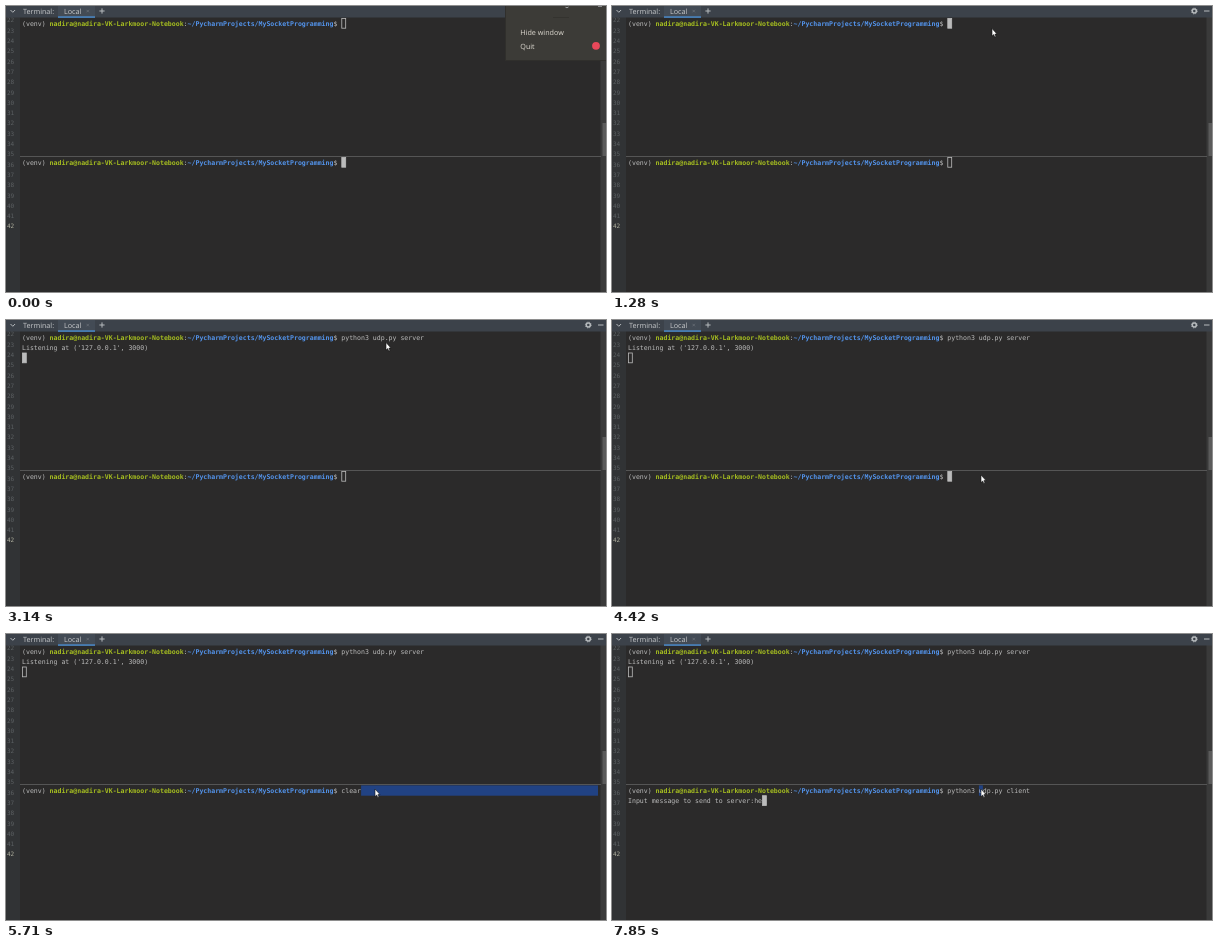
Animation of 600 by 286 pixels, one loop 8000 ms. Source, as an HTML page:

```html
<!DOCTYPE html>
<html lang="en">
<head>
<meta charset="utf-8">
<title>Terminal session</title>
<style>
  html, body { margin: 0; width: 100%; height: 100%; overflow: hidden; background: #2b2a2a; }
  svg { display: block; width: 600px; height: 286px; }
  text { text-rendering: geometricPrecision; white-space: pre; }
  .mono { font: 6.55px "DejaVu Sans Mono", "Noto Sans Mono", monospace; fill: #bbb; }
  .user { font-weight: bold; fill: #a5bd20; }
  .path { font-weight: bold; fill: #5394ec; }
  .ui { font: 7.2px "Open Sans", "Noto Sans", sans-serif; fill: #c8cacc; }
  .num { font: 6px "DejaVu Sans Mono", monospace; fill: #5c6063; }
  .line { fill: none; stroke: #b6babd; stroke-width: 1; }
</style>
</head>
<body>
<svg viewBox="0 0 600 286">
  <rect width="600" height="286" fill="#2b2a2a"/>
  <rect width="14" height="286" fill="#313335"/>
  <g id="gutter"></g>
  <rect x="594.5" y="11" width="5.5" height="275" fill="#3a3a3a"/>
  <rect x="596.5" y="117" width="3.5" height="33" fill="#5b5b5b"/>
  <rect x="14" y="150" width="581" height="1" fill="#555"/>

  <rect width="600" height="11.5" fill="#3c424a"/>
  <rect x="52" width="37" height="11.5" fill="#434b55"/>
  <rect x="52" y="10.3" width="37" height="1.5" fill="#4a88c7"/>
  <path class="line" d="M4.5 4L6.8 6.3L9.1 4M93.4 5H98.6M96 2.4V7.6M592 5H597.5"/>
  <path class="line" d="M80.5 3.8L83 6.3M83 3.8L80.5 6.3" style="stroke:#747a80;stroke-width:.6"/>
  <text class="ui" x="17" y="7.6">Terminal:</text>
  <text class="ui" x="58" y="7.6">Local</text>
  <circle class="line" cx="582.3" cy="5" r="2" style="stroke-width:1.5"/>
  <circle class="line" cx="582.3" cy="5" r="2.9" style="stroke-width:.9;stroke-dasharray:1.14"/>

  <rect id="selection" height="10.3" y="151.4" fill="#214283"/>
  <g id="top"></g>
  <g id="bottom"></g>

  <g id="menu">
    <rect x="499.5" y="-1" width="102" height="55.5" fill="#3c3b37" stroke="#302f2c"/>
    <path d="M559.5 1.3q1.6 1 3 -.3M592 .3h4" class="line" style="stroke-width:.8"/>
    <path d="M547 11.5h16" stroke="#34332f"/>
    <text class="ui" x="514.3" y="28.6" style="fill:#dfdbd2">Hide window</text>
    <text class="ui" x="514.3" y="43" style="fill:#dfdbd2">Quit</text>
    <circle cx="590" cy="39.8" r="3.9" fill="#e8485a"/>
  </g>
  <path id="mouse" d="M0 0V7.6L1.7 6.1L2.8 8.6L4 8L2.9 5.6H5Z" fill="#fff" stroke="#111" stroke-width=".6"/>
</svg>
<script>
const LOOP = 8000, CELL = 3.943, ROW = 10.3, LEFT = 16, PROMPT = 81;
const $ = id => document.getElementById(id);
const col = n => LEFT + n * CELL;
const prompt = '(venv) <tspan class="user">nadira@nadira-VK-Larkmoor-Notebook</tspan>:' +
  '<tspan class="path">~/PycharmProjects/MySocketProgramming</tspan>$ ';

for (let n = 22; n <= 42; n++) {
  $('gutter').innerHTML += `<text class="num" x="1" y="${16.4 + (n - 22) * ROW}"` +
    `${n === 42 ? ' style="fill:#b0b0a0"' : ''}>${n}</text>`;
}

// Value of the last [time, value] step reached
const at = (t, steps) => steps.filter(s => s[0] <= t).pop()[1];

function pane(id, y, command, output, focused, showCursor = true) {
  const row = output == null ? 0 : output.endsWith('\n') ? 2 : 1;
  const n = [PROMPT + command.length, (output || '').length, 0][row];
  let html = `<text class="mono" x="${LEFT}" y="${y + 7.8}">${prompt}${command}</text>`;
  if (row) html += `<text class="mono" x="${LEFT}" y="${y + 7.8 + ROW}">${output.trim()}</text>`;
  if (showCursor) {
    html += `<rect x="${col(n) + .4}" y="${y + row * ROW + .2}" width="3.9" height="9.8" ` +
      `fill="${focused ? '#bbb' : 'none'}" stroke="#bbb" stroke-width=".8"/>`;
  }
  if ($(id).dataset.html !== html) $(id).innerHTML = $(id).dataset.html = html;
}

const ease = p => { p = Math.min(1, Math.max(0, p)); return p * p * (3 - 2 * p); };

function draw(t) {
  $('menu').style.display = t < 140 ? '' : 'none';

  const tick = Math.floor(t * .007 + .05) / .007;
  const enter = ease((tick - 430) / 570), down = ease((tick - 3860) / 420);
  const mx = 570 - 190 * enter - 11 * down, my = 5 + 17.5 * enter + 132.5 * down;
  $('mouse').style.display = t < 570 ? 'none' : '';
  $('mouse').setAttribute('transform', `translate(${mx} ${my})`);

  const topFocus = t >= 1140 && t < 4280;
  const server = at(t, [[0, ''], [1850, 'clear'], [2140, 'python3 udp.py server']]);
  const client = at(t, [[0, ''], [5280, 'clear'], [5850, 'python3 udp.py client']]);
  const typed = at(t, [[0, ''], [7710, 'h'], [7850, 'he']]);

  pane('top', 12.2, server, t < 2850 ? null : "Listening at ('127.0.0.1', 3000)\n", topFocus);
  pane('bottom', 151.2, client, t < 6570 ? null : 'Input message to send to server:' + typed,
    !topFocus && t >= 0 && (t < 1140 || t >= 4280), client !== 'clear');

  // An open line is marked to its end; a full one only at the clicked cell
  const from = client.length > 5 ? col(PROMPT + 8) : col(PROMPT + client.length);
  $('selection').setAttribute('x', from);
  $('selection').setAttribute('width', t < 4570 ? 0 : client.length > 5 ? CELL : 592 - from);
}

function frame() {
  draw(performance.now() % LOOP);
  requestAnimationFrame(frame);
}
frame();
</script>
</body>
</html>
```
